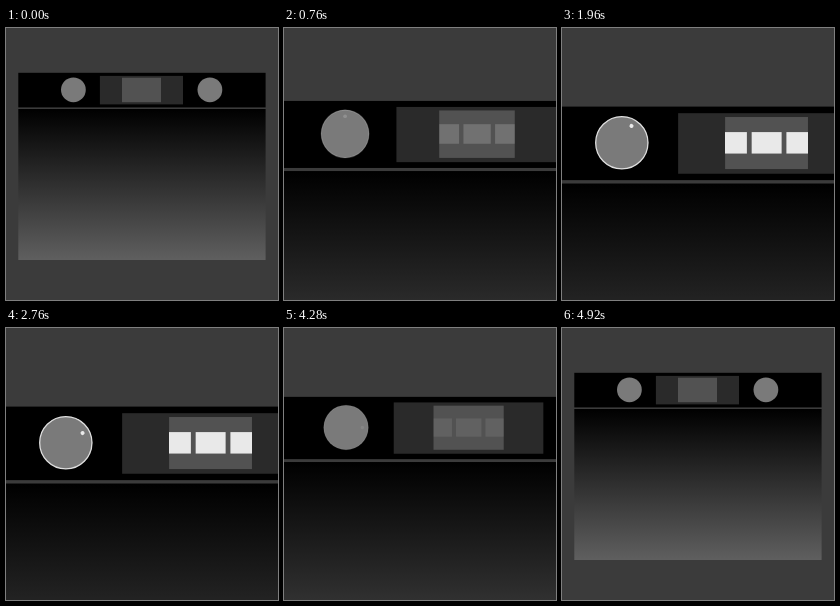
Recreate the animation shown at these times as an HTML page. Size 272 by 272 pixels, loop 5520 ms.

```html
<!DOCTYPE html>
<html lang="en">
<head>
<meta charset="utf-8">
<title>Oven</title>
<style>
  html, body { margin: 0; width: 100%; height: 100%; overflow: hidden; background: #3b3b3b; }
  svg { display: block; width: 100vw; height: 100vh; }
</style>
</head>
<body>
<svg viewBox="0 0 272 272">
  <defs>
    <linearGradient id="glass" x1="0" y1="0" x2="0" y2="1">
      <stop offset="0" stop-color="#000"/>
      <stop offset="1" stop-color="#5f5f5f"/>
    </linearGradient>
    <clipPath id="screen"><rect x="116" y="49.7" width="39" height="24.5"/></clipPath>
  </defs>
  <rect width="272" height="272" fill="#3b3b3b"/>
  <g id="oven">
    <rect x="12.3" y="44.8" width="247.3" height="34.6"/>
    <rect x="12.3" y="81" width="247.3" height="151" fill="url(#glass)"/>
    <rect x="93.9" y="47.9" width="83.1" height="28.5" fill="#2a2a2a"/>
    <rect x="116" y="49.7" width="39" height="24.5" fill="#525252"/>
    <g fill="#7a7a7a">
      <circle cx="67.4" cy="61.8" r="12.4"/>
      <circle cx="203.9" cy="61.8" r="12.4"/>
    </g>
    <g id="lit" fill="#e9e9e9">
      <circle cx="67.4" cy="61.8" r="12.3" fill="none" stroke="#dedede" stroke-width=".6"/>
      <circle id="dot" cx="67.4" cy="52.7" r=".95"/>
      <g clip-path="url(#screen)"><g id="strip"></g></g>
    </g>
  </g>
</svg>
<script>
  const $ = id => document.getElementById(id);
  const oven = $('oven'), lit = $('lit'), dot = $('dot'), strip = $('strip');
  const LOOP = 5520, ZOOM = 1.125, PITCH = 16.35;
  const TURNS = [1560, 2360, 3160];

  for (let i = -2; i <= 5; i++) {
    const block = document.createElementNS('http://www.w3.org/2000/svg', 'rect');
    const box = { x: 128.5 + i * PITCH, y: 56.8, width: 14.1, height: 10.1 };
    for (const key in box) block.setAttribute(key, box[key]);
    strip.append(block);
  }

  const ramp = (t, start, length) => Math.min(1, Math.max(0, (t - start) / length));
  const ease = p => (1 - Math.cos(Math.PI * p)) / 2;

  function draw(t) {
    const zoom = ease(ramp(t, 0, 1040)) - ease(ramp(t, 3920, 1000));
    const light = ramp(t, 680, 400) - ramp(t, 3920, 400);
    const turn = TURNS.reduce((sum, start) => sum + ease(ramp(t, start, 400)), 0);

    oven.setAttribute('transform',
      `translate(${-83.4 * zoom} ${-16.6 * zoom}) scale(${1 + ZOOM * zoom})`);
    lit.setAttribute('opacity', light);
    dot.setAttribute('transform', `rotate(${30 * turn} 67.4 61.8)`);
    strip.setAttribute('transform', `translate(${-PITCH * turn} 0)`);
  }

  const begin = performance.now();
  function tick() {
    draw((performance.now() - begin) % LOOP);
    requestAnimationFrame(tick);
  }
  tick();
</script>
</body>
</html>
```
